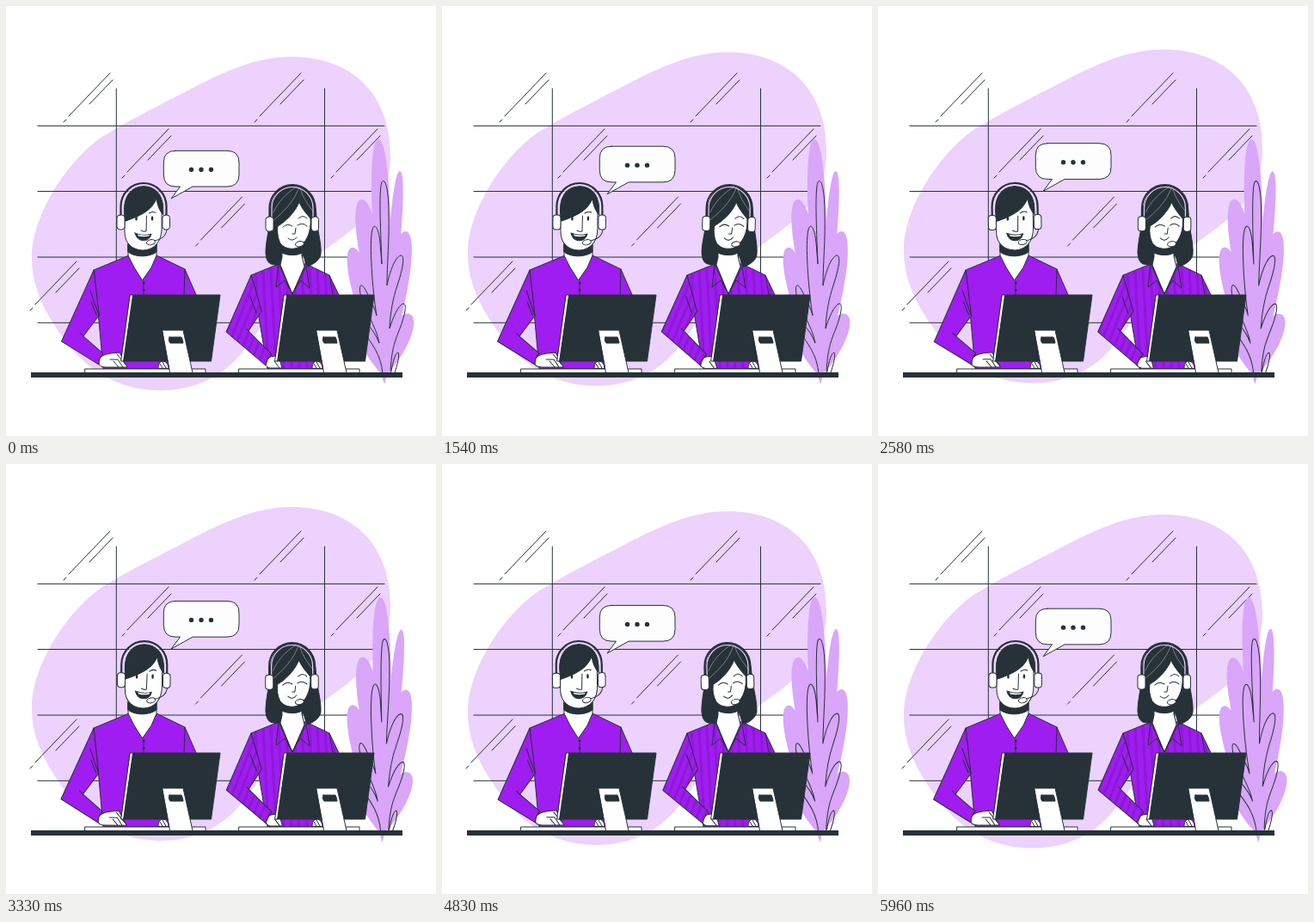
Animation, 500 px wide and 500 px high, one loop 6000 ms. Source, as an HTML page:

```html
<!DOCTYPE html>
<html lang="en">
<head>
<meta charset="utf-8">
<title>Support desk</title>
<style>
html, body { margin: 0; width: 100%; height: 100%; overflow: hidden; background: #fff; }
svg { display: block; width: 100vw; height: 100vh; }
.line { fill: none; stroke: #263238; stroke-width: 1; stroke-linecap: round; stroke-linejoin: round; }
.white { fill: #fff; }
.shirt { fill: #9f1df0; }
.dark { fill: #263238; }
.band { stroke-width: 2.2; }
.gap { fill: none; stroke: #ecd2fd; stroke-width: 1.2; }
.strand { fill: none; stroke: #8b9599; stroke-width: .8; }
</style>
</head>
<body>
<svg viewBox="0 0 500 500">
  <defs>
    <pattern id="torso" width="9" height="9" patternUnits="userSpaceOnUse" patternTransform="rotate(-3)">
      <path fill="#9f1df0" d="M0 0H9V9H0Z"/><path fill="#8c1ad5" d="M2 0H5V9H2Z"/>
    </pattern>
    <pattern id="sleeve" width="8" height="9" patternUnits="userSpaceOnUse" patternTransform="rotate(22)">
      <path fill="#9f1df0" d="M0 0H8V9H0Z"/><path fill="#8c1ad5" d="M2 0H5V9H2Z"/>
    </pattern>
    <g id="glare" class="line">
      <path d="M0 0L-48 50M-51 54L-54 57M3 8L-24 36"/>
    </g>
    <g id="computer" class="line">
      <path class="white" d="M92 422H232V426.5H92Z"/>
      <path class="white" d="M177 421C177 416 179 413 183 413C187 414 189 418 189 421ZM182 414L186 421M179 416L182 421"/>
      <path class="white" d="M144.500 336H148L137 413H134Z"/>
      <path class="dark" d="M148 336H249L238.500 413H137Z"/>
      <path class="white" d="M182 377H206L217 426.500H191Z"/>
      <path class="dark" d="M190 385H204Q206 389 206 392H191Q188 389 190 385Z"/>
    </g>
    <g id="headset" class="line">
      <path class="band" d="M133.500 246V233A26.500 27 0 0 1 186.500 233V246"/>
      <path class="gap" d="M136 243V233A24 24.500 0 0 1 184 233V243"/>
      <rect class="white" x="129" y="243" width="9" height="17" rx="3.500"/>
      <rect class="white" x="182" y="243" width="8.500" height="17" rx="3.500"/>
      <path d="M187 260C186 268 181 271 173 273"/>
      <ellipse class="white" cx="168.500" cy="274.800" rx="5" ry="3" transform="rotate(-12 168 275)"/>
    </g>
  </defs>

  <path id="blob" fill="#ecd2fd" d="M332 59C397 59 447 97 447 175C447 235 405 258 365 288C325 320 300 375 270 408C245 436 212 447 180 447C135 447 98 427 72 393C48 362 30 330 30 293C30 240 75 177 112 152C150 129 185 112 212 98C252 77 290 59 332 59Z"/>

  <path class="line" stroke-linecap="butt" d="M37 139.400H440M37 215.500H440M37 292H440M37 368.300H440M128.300 96V368M370.500 96V368"/>
  <g id="glares"></g>

  <g id="bubble" class="line">
    <path fill="#fdfdfd" d="M197 168.300H257Q271 168.300 271 182V196Q271 210 257 210H217L192 224L202.500 210H197Q183.300 210 183.300 196V182Q183.300 168.300 197 168.300Z"/>
    <g class="dark" stroke="none">
      <circle cx="215.500" cy="190.300" r="2.700"/><circle cx="227" cy="190.300" r="2.700"/><circle cx="238.500" cy="190.300" r="2.700"/>
    </g>
  </g>

  <g id="plant">
    <g id="leaves" fill="#d9a6fa"></g>
    <path class="line" d="M438 427C436 405 425 392 415 378C410 368 413 362 420 370C426 376 431 384 434 392C430 370 416 355 412 335C410 322 414 322 419 332C424 342 429 352 431 360C426 330 422 275 426 260C428 252 433 256 435 275L437 300C436 270 433 215 437 205C441 198 445 215 445 240C446 270 443 300 443 325C446 310 452 292 459 290C465 290 460 310 455 325C450 340 447 355 446 375C450 362 456 348 462 346C467 346 463 362 458 375C452 390 448 400 447 427M448 425C450 412 453 403 456 403C458 406 455 418 452 426"/>
  </g>

  <!-- man -->
  <g class="line">
    <path class="shirt" d="M143 290L102 307L107 355L113 422H206L207 338H222L208 306L175 290Z"/>
    <path d="M208 306L207 338M160 320V336"/>
    <path class="white" d="M142 276V290L149 304L158.500 319L169 304L175 290V276Z"/>
    <circle class="dark" cx="160" cy="322" r="1"/><circle class="dark" cx="160" cy="330.500" r="1"/>
    <path class="dark" d="M142 277H175V286C166 292.500 150 292.500 142 286Z"/>
    <g id="manArm">
      <path class="white" d="M107 413C110 405 118 404 132 403L141 420H116C110 420 107 417 107 413ZM121 411L130 411L136 420M125 413L131 420M129 405L140 418"/>
      <path class="shirt" d="M102 307L64.500 390L108 417Q108 408 113 404L90 384L108 360Z"/>
      <path d="M98 331L108 360M99 344L105 359M90 384L86 380"/>
    </g>
    <g id="manHead">
      <path class="white" d="M138 235V262C138 278 149 284 160 284C172 283 181 275 181 258V235C181 225 175 220 160 220Z"/>
      <path class="dark" d="M139 250C133 222 146 209.500 160 209.500C176 209.500 184 222 183 243C179 239 176 232 175 224C170 236 160 243 139 250Z"/>
      <g class="dark" stroke="none">
        <ellipse cx="151.500" cy="247" rx="1.300" ry="2.800"/><ellipse cx="170" cy="247" rx="1.300" ry="2.800"/>
      </g>
      <path d="M166 241Q170 238 174 240M163.500 244L163 262Q160 263 157 261"/>
      <path class="dark" d="M150 264C157 267 163 267 169 265C167 275 153 276 150 264Z"/>
      <path class="white" stroke="none" d="M153 265.600C158 267 163 267 167 266L166 267.600Q160 269 154 267.500Z"/>
      <use href="#headset"/>
    </g>
  </g>

  <!-- woman -->
  <g class="line">
    <path fill="url(#torso)" d="M317 300L285 313L292 350L304 422H385V338H388L376 313L349 300Z"/>
    <path d="M376 313L380 336"/>
    <path id="hair" class="dark" d="M332 209.500C306 209.500 307 240 305 262C302 280 299 295 308 300C314 302 320 301 326 298L346 290C348 296 348 300 350 303C360 300 366 293 366 288C367 275 362 262 361 245C360 220 350 209.500 332 209.500Z"/>
    <path class="white" d="M321 276V292L319 301L333 335L347 303L344 291V276Z"/>
    <path fill="url(#torso)" d="M317 300L314 327L324 319L333 335ZM349 303L353 328L342 319L333 335Z"/>
    <path class="dark" d="M321 278H344V287C339 290.500 327 290.500 321 287Z"/>
    <g id="womanArm">
      <path class="white" d="M301 414C302 408 309 407 317 407L321 421H307C302 420 301 417 301 414ZM312 413L318 421"/>
      <path fill="url(#sleeve)" d="M285 313L256 379L302 418Q303 411 309 405L282 378L297 355Z"/>
      <path d="M284 338L291 357M282 378L279 375"/>
    </g>
    <g id="womanHead">
      <path class="white" d="M316 256C325 251 336 240 341 228C344 236 350 242 354 247C355 262 350 272 344 278C338 284 325 284 319 276C316 270 315 262 316 256Z"/>
      <path class="strand" d="M341 210C335 228 322 240 310 250M338 210C325 218 315 230 311 240M342 212C346 225 352 232 358 240"/>
      <path d="M322 257Q327 252 333 256M339 255Q345 251 350 256M340 247Q345 242 350 247M337 258L336 265H333M328 270Q333 275 338 269"/>
      <use href="#headset" transform="translate(173 2)"/>
    </g>
  </g>

  <use href="#computer"/>
  <use href="#computer" x="179"/>
  <path class="dark" d="M29 426H461V432H29Z"/>
</svg>
<script>
const LOOP = 6000;
const byId = id => document.getElementById(id);

byId('glares').innerHTML = [[121, 78], [343, 78], [189, 143], [432, 143], [274.5, 222], [82, 297]]
  .map(([x, y]) => `<use href="#glare" x="${x}" y="${y}"/>`).join('');

// Leaf from base (x, y) to tip (u, v), bulging w to each side
function leaf([x, y, u, v, w]) {
  const dx = u - x, dy = v - y, len = Math.hypot(dx, dy);
  const nx = -dy / len * w, ny = dx / len * w;
  const mx = x + dx * .45, my = y + dy * .45;
  return `<path d="M${x} ${y}C${mx + nx} ${my + ny} ${u + nx} ${v + ny} ${u} ${v}` +
    `C${u - nx} ${v - ny} ${mx - nx} ${my - ny} ${x} ${y}Z"/>`;
}
byId('leaves').innerHTML = [
  [442, 400, 433, 155, 14], [443, 390, 458, 192, 9], [443, 400, 413, 225, 17],
  [441, 420, 465, 262, 16], [439, 427, 402, 281, 16], [441, 430, 469, 358, 15],
  [438, 430, 405, 350, 14], [440, 440, 438, 260, 24]
].map(leaf).join('');

const wave = (ms, period) => Math.sin(2 * Math.PI * ms / period);
const turn = (id, deg, x, y) => byId(id).setAttribute('transform', `rotate(${deg} ${x} ${y})`);

function draw(now) {
  const t = now % LOOP;
  const lift = -10 * (1 - Math.abs(1 - t / 3000));
  for (const id of ['blob', 'bubble']) byId(id).setAttribute('transform', `translate(0 ${lift})`);

  const man = wave(t, 3000), woman = wave(t, LOOP);
  turn('manHead', 1.2 * man, 158, 290);
  turn('manArm', .7 * man, 105, 308);
  for (const id of ['hair', 'womanHead']) turn(id, 1.2 * woman, 333, 290);
  turn('womanArm', .7 * woman, 287, 314);

  // The plant rests for two seconds before it sways
  turn('plant', t < 2000 ? 0 : wave(t - 2000, LOOP), 435, 290);
}

let start;
function tick(now) {
  start ??= now;
  draw(now - start);
  requestAnimationFrame(tick);
}
draw(0);
requestAnimationFrame(tick);
</script>
</body>
</html>
```
